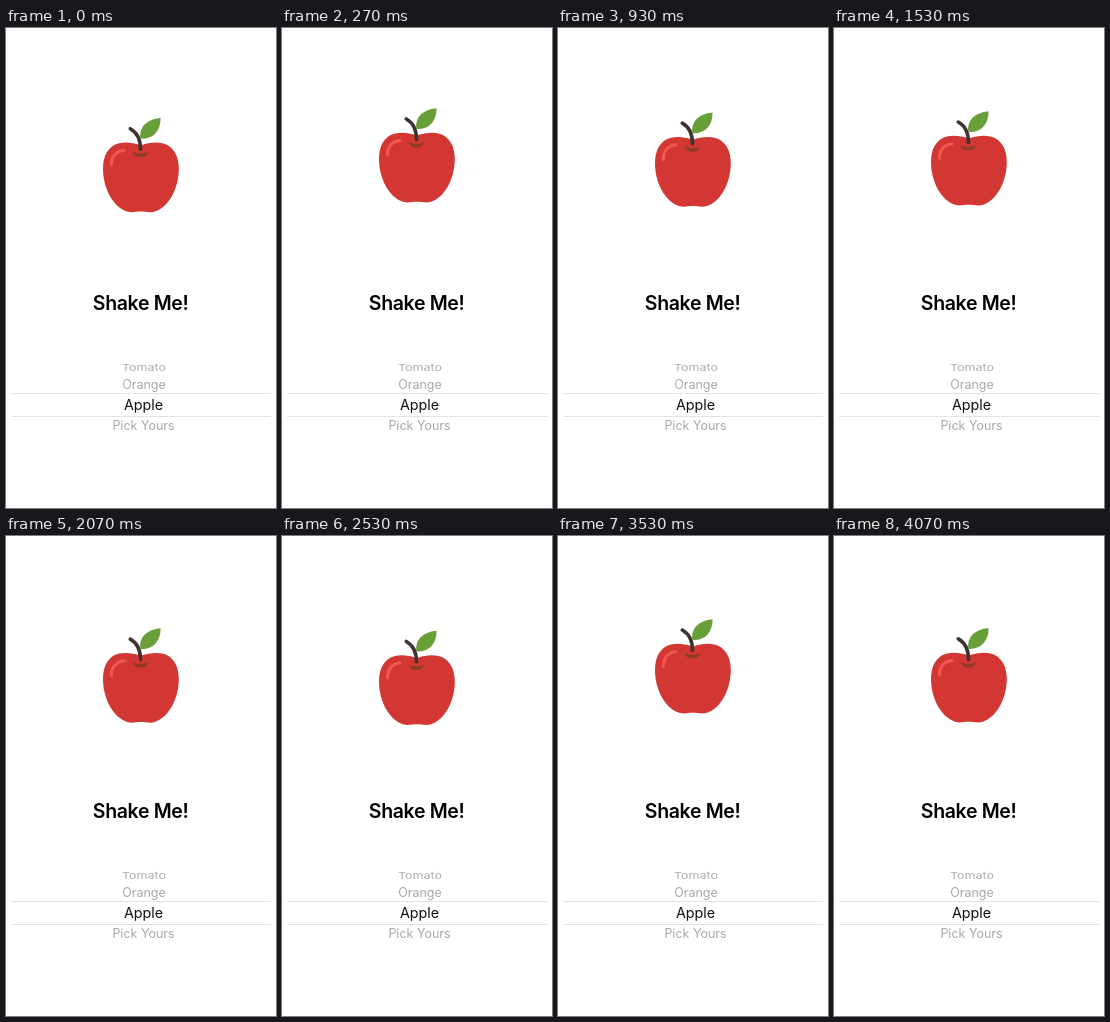
An HTML page that plays this animation: 270 px wide and 480 px high, repeating every 4140 ms.

```html
<!DOCTYPE html>
<html lang="en">
<head>
<meta charset="utf-8">
<title>Shake Me!</title>
<style>
  html, body { margin: 0; width: 100%; height: 100%; overflow: hidden; background: #fff; }
  svg { display: block; width: 100vw; height: 100vh; }
  text { font: 12.5px Inter, Roboto, sans-serif; text-anchor: middle; fill: #a8a8a8; }
  .title { font-size: 19.5px; font-weight: 600; letter-spacing: -.35px; fill: #000; }
  .chosen { font-size: 14.3px; fill: #111; }
  .far { fill: #acacac; }
</style>
</head>
<body>
<svg viewBox="0 0 270 480">
  <g id="apple">
    <path fill="#d23733" d="M134.8 110.5C127 107.5 119 107 113 108.3C102 111 97 121 97 134C97 153 107 172 121 176.600C126 178.200 130 176.600 134.800 176.600C139.600 176.600 144 178.200 149 176.600C163 172 172.800 153 172.800 134C172.800 121 167.500 111 156.500 108.300C150.500 107 142.500 107.500 134.800 110.500Z"/>
    <path fill="#913a26" d="M126.500 116.800Q134.500 120.500 142 116.800Q141 122.300 134.500 122.300Q128 122.300 126.500 116.800Z"/>
    <path fill="none" stroke="#f4564f" stroke-width="3.200" stroke-linecap="round" d="M105.300 130C105.500 122 110 116 118 115.500"/>
    <path fill="none" stroke="#403230" stroke-width="3.600" stroke-linecap="round" d="M124.300 93.800C131 97.500 134.500 104 134.500 114.300"/>
    <path fill="#689f38" d="M134.200 103.800C133 92 140 84.500 154.600 83C154.600 96 147.500 104.500 134.200 103.800Z"/>
  </g>
  <text class="title" x="134.600" y="282.200">Shake Me!</text>
  <text class="far" transform="translate(138 342.500) scale(1 .74)">Tomato</text>
  <text x="138" y="361">Orange</text>
  <text class="chosen" x="137.500" y="382.300">Apple</text>
  <text x="137.500" y="402">Pick Yours</text>
  <path stroke="#e2e2e2" d="M5 365.500H265M5 388.500H265"/>
</svg>
<script>
  const LOOP = 4140, STEP = 200 / 3, PERIOD = 2006, PEAK = 346;
  const apple = document.getElementById('apple');

  // Damped spring away from the top of the jump; it auto-reverses into the next one.
  const spring = u => 0.68 * (u - 88) * Math.exp(-u / 107);

  function draw(now) {
    const t = Math.floor((now % LOOP + 3.4) / STEP) * STEP;
    const phase = t - PEAK;
    const u = Math.abs(phase - PERIOD * Math.round(phase / PERIOD));
    apple.setAttribute('transform', `translate(0 ${spring(u).toFixed(2)})`);
  }

  const start = performance.now();
  function tick() {
    draw(performance.now() - start);
    requestAnimationFrame(tick);
  }
  tick();
</script>
</body>
</html>
```
